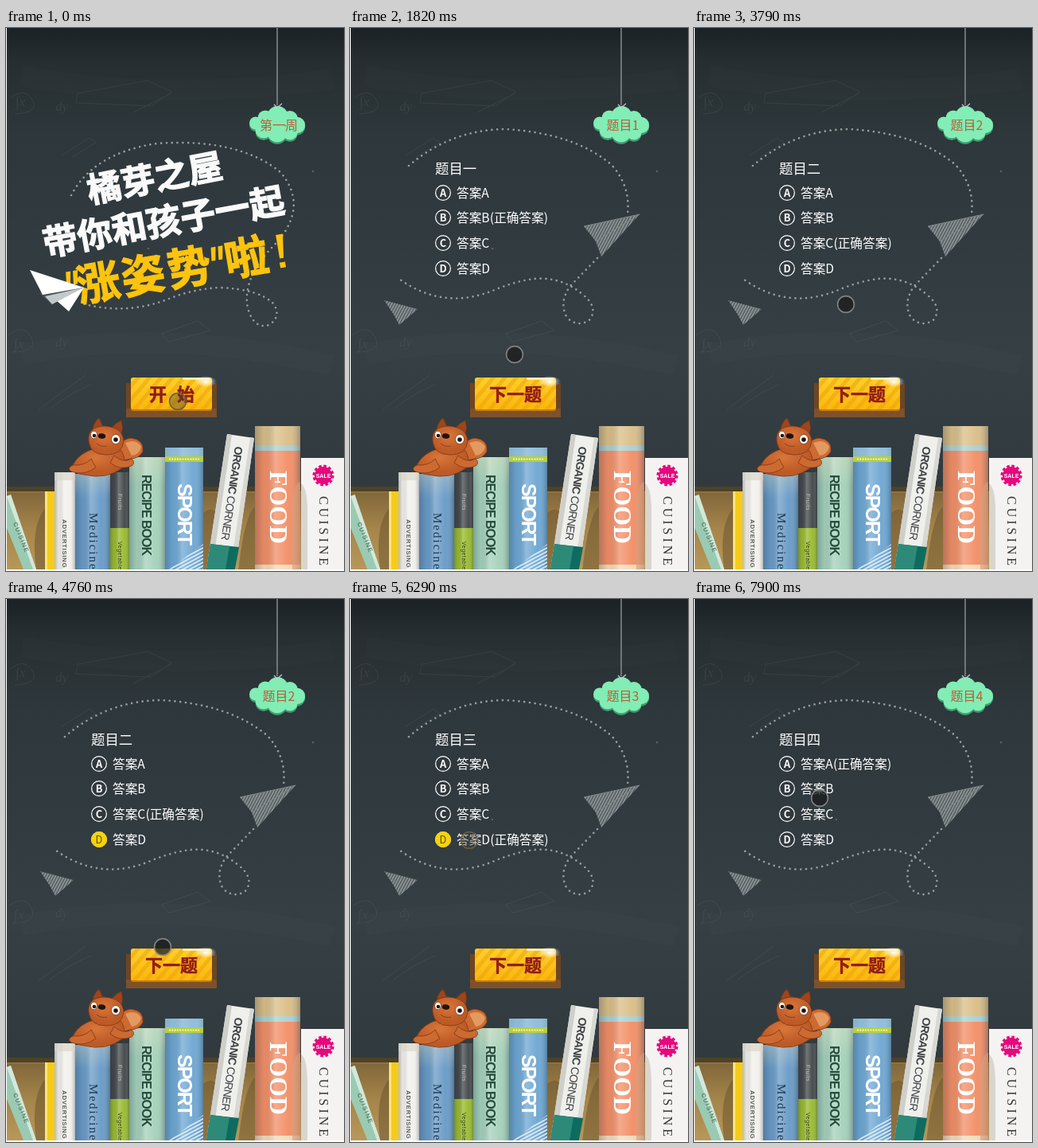
Animation, 425 px wide and 682 px high, one loop 8000 ms. Source, as an HTML page:

```html
<!DOCTYPE html>
<html lang="zh-CN">
<head>
<meta charset="utf-8">
<title>题目</title>
<style>
html, body { margin: 0; width: 100%; height: 100%; overflow: hidden; background: #fff; }
svg { display: block; width: 425px; height: 682px; }
text { font-family: "Noto Sans CJK SC", "Noto Sans CJK", "Noto Sans", sans-serif; }
.sans { font-family: "Liberation Sans", sans-serif; }
.serif { font-family: "Liberation Serif", serif; }
.mid { text-anchor: middle; }
.headline { font-weight: 900; fill: #fafafa; stroke: #fafafa; stroke-width: 1.3; text-anchor: middle; }
.yellow { fill: #fcc30f; stroke: #fcc30f; }
.label { font-weight: 700; font-size: 22px; fill: #921c17; stroke: #921c17; stroke-width: .5; text-anchor: middle; }
.tag { font-size: 16px; fill: #b9623a; text-anchor: middle; }
.dots { fill: none; stroke: #969c9d; stroke-width: 2.7; stroke-linecap: round; stroke-dasharray: 0 6.8; }
.chalk { fill: none; stroke: #c9d3d3; opacity: .08; }
.chalk text { font: italic 17px "Liberation Serif", serif; fill: #c9d3d3; stroke: none; }

.anim { animation: 8s step-end infinite; }
#intro { animation-name: intro; }
#board { animation-name: board; }
#status { animation-name: status; }
#q1 { animation-name: q1; }
#q2 { animation-name: q2; }
#q3 { animation-name: q3; }
#q4 { animation-name: q4; }
#pick1 { animation-name: pick1; }
#pick2 { animation-name: pick2; }
#pick3 { animation-name: pick3; }
#cursor { animation-name: move, press; stroke-width: 1.6; }

@keyframes intro { 0% { opacity: 1 } 14.375%, 100% { opacity: 0 } }
@keyframes board { 0% { opacity: 0 } 14.375%, 100% { opacity: 1 } }
@keyframes status { 0% { opacity: 0 } 14.375% { opacity: 1 } 17.75%, 100% { opacity: 0 } }
@keyframes q1 { 0% { opacity: 0 } 14.375% { opacity: 1 } 43.875%, 100% { opacity: 0 } }
@keyframes q2 { 0% { opacity: 0 } 43.875% { opacity: 1 } 65.875%, 100% { opacity: 0 } }
@keyframes q3 { 0% { opacity: 0 } 65.875% { opacity: 1 } 90.125%, 100% { opacity: 0 } }
@keyframes q4 { 0% { opacity: 0 } 90.125%, 100% { opacity: 1 } }
@keyframes pick1 { 0% { opacity: 0 } 33.25%, 100% { opacity: 1 } }
@keyframes pick2 { 0% { opacity: 0 } 54.125%, 100% { opacity: 1 } }
@keyframes pick3 { 0% { opacity: 0 } 78.625%, 100% { opacity: 1 } }
@keyframes press {
  0%, 42.125%, 52.5%, 63.75%, 75.125%, 87.875% { fill: rgba(70, 66, 52, .38); stroke: rgba(104, 94, 68, .95) }
  19.625%, 47.375%, 57.625%, 68%, 80.875%, 92%, 100% { fill: rgba(26, 28, 30, .75); stroke: #808080 }
}
@keyframes move {
  0% { transform: translate(216px, 469px) }
  19.625% { transform: translate(214px, 455px) }
  21.625% { transform: translate(207px, 410px) }
  23.625% { transform: translate(195px, 350px) }
  25.625% { transform: translate(182px, 295px) }
  27.5% { transform: translate(172px, 262px) }
  29.5% { transform: translate(168px, 250px) }
  31.375% { transform: translate(168px, 242px) }
  36.75% { transform: translate(172px, 264px) }
  38.5% { transform: translate(190px, 350px) }
  40.25% { transform: translate(204px, 440px) }
  42.125% { transform: translate(206px, 460px) }
  47.375% { transform: translate(191px, 347px) }
  49.125% { transform: translate(172px, 315px) }
  50.75% { transform: translate(154px, 300px) }
  52.5% { transform: translate(150px, 298px) }
  57.625% { transform: translate(170px, 360px) }
  59.5% { transform: translate(197px, 437px) }
  61.625% { transform: translate(197px, 454px) }
  68% { transform: translate(195px, 400px) }
  70.25% { transform: translate(186px, 337px) }
  71.75% { transform: translate(170px, 316px) }
  73.375% { transform: translate(152px, 304px) }
  75.125% { transform: translate(150px, 303px) }
  80.875% { transform: translate(168px, 350px) }
  83.25% { transform: translate(200px, 440px) }
  85.5% { transform: translate(215px, 468px) }
  92% { transform: translate(210px, 440px) }
  93.75% { transform: translate(195px, 370px) }
  95.375% { transform: translate(178px, 300px) }
  97.125% { transform: translate(163px, 258px) }
  98.75%, 100% { transform: translate(158px, 250px) }
}
</style>
</head>
<body>
<svg viewBox="0 0 425 682">
  <defs>
    <clipPath id="stage"><path d="M1 0H425V680H1Z"/></clipPath>
    <linearGradient id="slate" x2="0" y2="1">
      <stop offset="0" stop-color="#1b2124"/><stop offset=".06" stop-color="#262e31"/>
      <stop offset=".2" stop-color="#2e373b"/><stop offset=".6" stop-color="#353f44"/>
      <stop offset="1" stop-color="#2e373b"/>
    </linearGradient>
    <linearGradient id="wood" x2="0" y2="1">
      <stop offset="0" stop-color="#7b6238"/><stop offset=".5" stop-color="#a5854a"/>
      <stop offset="1" stop-color="#b9985a"/>
    </linearGradient>
    <linearGradient id="round">
      <stop offset="0" stop-color="#203040" stop-opacity=".28"/><stop offset=".2" stop-color="#203040" stop-opacity=".05"/>
      <stop offset=".45" stop-color="#fff" stop-opacity=".26"/><stop offset=".75" stop-color="#fff" stop-opacity=".04"/>
      <stop offset="1" stop-color="#203040" stop-opacity=".32"/>
    </linearGradient>
    <linearGradient id="warm" x2="0" y2="1">
      <stop offset="0" stop-color="#efe6c4" stop-opacity=".3"/><stop offset=".25" stop-color="#efe6c4" stop-opacity="0"/>
    </linearGradient>
    <linearGradient id="gold" x2="0" y2="1">
      <stop offset="0" stop-color="#ffd02a"/><stop offset="1" stop-color="#fbb70c"/>
    </linearGradient>
    <radialGradient id="glow"><stop offset="0" stop-color="#fff"/><stop offset="1" stop-color="#fff" stop-opacity="0"/></radialGradient>
    <radialGradient id="fur" cx=".45" cy=".35"><stop offset="0" stop-color="#d9763b"/><stop offset="1" stop-color="#bd5a26"/></radialGradient>
    <pattern id="stripes" width="11" height="11" patternUnits="userSpaceOnUse" patternTransform="rotate(40)">
      <path d="M0 0H5V11H0Z" fill="#e9a00c" opacity=".5"/>
    </pattern>
    <pattern id="hatch" width="3.2" height="30" patternUnits="userSpaceOnUse" patternTransform="rotate(28)">
      <path d="M0 0H3.2V30H0Z" fill="#8d9495" opacity=".3"/><path d="M0 0H1.9V30H0Z" fill="#8d9495"/>
    </pattern>
    <pattern id="diag" width="4" height="4" patternUnits="userSpaceOnUse" patternTransform="rotate(62)">
      <path d="M0 0H1.6V4H0Z" fill="#e8f4fb"/>
    </pattern>
    <g id="cloud">
      <circle cx="314" cy="119.5" r="8"/><circle cx="326" cy="113" r="9.5"/><circle cx="341.5" cy="111" r="13"/>
      <circle cx="357" cy="114" r="10"/><circle cx="366" cy="122" r="10.2"/><circle cx="357" cy="131" r="9.5"/>
      <circle cx="341" cy="131" r="12.5"/><circle cx="324" cy="128" r="10.5"/>
    </g>
  </defs>

  <g clip-path="url(#stage)">
    <path d="M0 0H425V682H0Z" fill="url(#slate)"/>
    <g class="chalk">
      <path d="M90 82l88-16 30 14-25 18-95-4zM5 88q18-14 28 2t-22 18M70 160l35-22 8 6-30 18M160 106l48-24M4 385q20-14 28 4t-24 18M40 480l60-44M55 478q30-22 52-30M195 384l46-16 16 12-52 14z"/>
      <path d="M20 60q180 34 390 4M20 410q180-36 390 14" stroke-width="26" opacity=".18"/>
      <text x="62" y="104">dy</text><text x="62" y="400">dy</text>
      <text x="12" y="98">∫x</text><text x="10" y="402">∫x</text>
    </g>
    <circle cx="386" cy="180" r="1.3" fill="#59635f"/><circle cx="179" cy="277" r="1.3" fill="#59635f"/>

    <path d="M341 0V97" stroke="#969d9e" stroke-width="1.3"/>
    <use href="#cloud" y="2.5" fill="#3f9a70"/>
    <use href="#cloud" fill="#82edb4"/>
    <path d="M341 100l-4-4m4 4l6-5" stroke="#c5cccb" stroke-width="1.2"/>

    <g id="shelf">
      <path d="M0 576H425V682H0Z" fill="url(#wood)"/>
      <path d="M0 576H425V582H0Z" fill="#4e4126"/><path d="M0 582H425V584H0Z" fill="#8d7342"/>
      <path d="M38 682Q30 622 52 600V682ZM247 682V610Q262 596 270 620V682ZM292 682Q300 610 314 600V682Z" fill="#6d562f" opacity=".55"/>

      <path d="M1 588L6 586L38 680H22L1 628Z" fill="#9bcab2"/>
      <path d="M1 588L6 586L38 680H34Z" fill="#d2e8db"/>
      <text class="sans" font-size="7.5" letter-spacing="1.5" fill="#2f5c49" transform="translate(9 622) rotate(68)">CUISINE</text>

      <path d="M49 582H61V680H49Z" fill="#f5cb1b"/><path d="M49 582H52V680H49Z" fill="#fbe377"/>
      <path d="M61 558H87V680H61Z" fill="#f2f0eb"/><path d="M61 558H87V680H61Z" fill="url(#round)"/>
      <path d="M61 558H87V568H61Z" fill="#d9d4c5" opacity=".6"/>
      <text class="sans" font-size="8" font-weight="700" letter-spacing=".6" fill="#5a5a5a" transform="translate(70.5 617) rotate(90)">ADVERTISING</text>

      <path d="M87 560H131V680H87Z" fill="#6799c6"/>
      <path d="M87 560H131V680H87Z" fill="url(#round)"/><path d="M87 560H131V680H87Z" fill="url(#warm)"/>
      <text class="serif" font-size="15" letter-spacing="2" fill="#183851" transform="translate(105 609) rotate(90)">Medicine</text>

      <path d="M131 558H155V628H131Z" fill="#414648"/><path d="M131 628H155V680H131Z" fill="#98b92b"/>
      <path d="M131 558H155V680H131Z" fill="url(#round)"/>
      <text class="sans" font-size="7" letter-spacing=".6" fill="#c3c7c5" transform="translate(140.5 585) rotate(90)">Fruits</text>
      <text class="sans" font-size="7" letter-spacing=".5" fill="#2f3d0d" transform="translate(140.5 645) rotate(90)">Vegetable</text>

      <path d="M155 539H200V680H155Z" fill="#a3d0b9"/>
      <path d="M155 539H200V680H155Z" fill="url(#round)"/><path d="M155 539H200V680H155Z" fill="url(#warm)"/>
      <text class="sans" font-size="16" letter-spacing="-1" font-weight="700" fill="#254c3b" transform="translate(171 561) rotate(90)">RECIPE BOOK</text>

      <path d="M200 527H248V680H200Z" fill="#6ca6d2"/><path d="M200 527H248V680H200Z" fill="url(#round)"/>
      <path d="M200 527H248V539H200Z" fill="#a7cbe0" opacity=".6"/>
      <path d="M200 538H248V545H200Z" fill="#b9cf3a"/>
      <path d="M205 541.5H243" stroke="#f0f5c8" stroke-width="2" stroke-dasharray="2 1.3"/>
      <path d="M205 680L248 648V680Z" fill="url(#diag)"/>
      <text class="sans" font-size="25" letter-spacing="-2" font-weight="700" fill="#fff" transform="translate(215.5 572) rotate(90)">SPORT</text>

      <path d="M278 510L312 515L288 680H252Z" fill="#efefec"/>
      <path d="M278 510L284 511L259 680H252Z" fill="#cfcfca"/>
      <path d="M307 514L312 515L288 680H282Z" fill="#d8d8d3"/>
      <path d="M257 648L293 652L288 680H252Z" fill="#0d6c5f"/><path d="M257 648L281 651L276 680H252Z" fill="#2d8a78"/>
      <text class="sans" font-size="14" letter-spacing="-.9" fill="#3c4143" transform="translate(288 525) rotate(98.5)"><tspan font-weight="700">ORGANIC</tspan> CORNER</text>

      <path d="M313 500H370V680H313Z" fill="#f28d64"/><path d="M313 500H370V524H313Z" fill="#d9bd86"/>
      <path d="M313 524H370V531H313Z" fill="#a9cfd0"/><path d="M313 674H370V680H313Z" fill="#f5d9b8"/>
      <path d="M313 500H370V680H313Z" fill="url(#round)"/>
      <text class="serif" font-size="31.8" font-weight="700" fill="#fff" transform="translate(331.5 556) rotate(90)">FOOD</text>

      <path d="M371 540H425V680H371Z" fill="#f4f3f1"/>
      <path d="M371 572Q379 578 379 606V680H371Z" fill="#d9d5cd"/>
      <path d="M360 680V590Q364 570 370 570V680Z" fill="#d9a07c" opacity=".6"/>
      <circle cx="399" cy="562" r="11" fill="#e5087e" stroke="#e5087e" stroke-width="5" stroke-dasharray="3.3 2.46"/>
      <text class="sans mid" x="399" y="564.5" font-size="7" font-weight="700" fill="#fff">SALE</text>
      <text class="serif" font-size="16" letter-spacing="4" fill="#333" transform="translate(394 588) rotate(90)">CUISINE</text>
    </g>

    <g id="squirrel" stroke="#7d3814" stroke-width=".8">
      <path d="M138 546Q138 517 157 515Q174 517 172 532Q167 541 156 541Z" fill="#cd6a32"/>
      <path d="M150 521Q164 515 170 526Q168 536 158 537Z" fill="#e39a60" stroke="none"/>
      <path d="M84 549Q92 533 113 528L142 527Q153 540 147 552Q126 568 98 561Q84 560 84 549Z" fill="url(#fur)"/>
      <path d="M109 504Q111 494 117 490L123 503ZM133 502Q139 495 145 493Q148 502 145 510Z" fill="#9d451c"/>
      <path d="M104 519Q102 501 123 500Q147 501 148 519Q146 536 126 536Q106 536 104 519Z" fill="url(#fur)"/>
      <path d="M136 537Q147 547 158 541Q163 546 158 550Q143 556 131 546Z" fill="#cd6a32"/>
      <path d="M107 541Q99 550 84 549Q76 553 82 557Q98 563 113 552Z" fill="#cd6a32"/>
      <ellipse cx="110.5" cy="511" rx="4" ry="4.8" fill="#fff"/><ellipse cx="138" cy="516.5" rx="5.5" ry="6" fill="#fff"/>
      <g fill="#22130c" stroke="none">
        <circle cx="111" cy="512" r="2.3"/><circle cx="138" cy="517" r="2.8"/>
        <ellipse cx="120.5" cy="512.5" rx="4.8" ry="3.2" transform="rotate(10 120.5 512.5)"/>
      </g>
      <path d="M114 522Q120 527 127 525" fill="none"/>
    </g>

    <path d="M151 446H265V489H151Z" fill="#6f4523"/><path d="M151 478H265V489H151Z" fill="#7f5129"/>
    <rect x="157" y="440" width="102" height="41" rx="3" fill="#c77f0b"/>
    <rect x="157" y="439" width="102" height="40" rx="3" fill="url(#gold)"/>
    <rect x="157" y="439" width="102" height="40" rx="3" fill="url(#stripes)"/>
    <path d="M222 440.5H256" stroke="#fff4c4" stroke-width="2.5"/>
    <ellipse cx="251" cy="444" rx="14" ry="7" fill="url(#glow)"/>

    <g id="intro" class="anim">
      <path class="dots" d="M82 210Q110 157 190 145Q292 138 345 181Q380 222 342 268Q296 312 304 352Q312 379 331 373Q347 362 336 346Q318 328 268 326Q235 328 205 340Q150 362 92 345"/>
      <text class="headline" font-size="43" transform="translate(187 188) rotate(-11)" dy=".37em">橘芽之屋</text>
      <text class="headline" font-size="44" transform="translate(198 243) rotate(-10.4)" dy=".37em">带你和孩子一起</text>
      <g class="yellow" transform="translate(116 320) rotate(-9.6)">
        <text class="headline yellow" font-size="55" y="20"><tspan x="0">涨</tspan><tspan x="57">姿</tspan><tspan x="116">势</tspan><tspan x="189">啦</tspan></text>
        <path stroke="none" d="M-38-20h6l-3 17h-5zM-29-20h6l-3 17h-5zM147-20h6l-3 17h-5zM156-20h6l-3 17h-5zM230-22h9l-4 30h-5zM229 13h7v7h-7z"/>
      </g>
      <path d="M42 333L98 326L57 347Z" fill="#4a5357"/>
      <path d="M30 304L98 326L46 335ZM98 326L79 356L62 341Z" fill="#fff"/>
      <path d="M49 337L98 326L58 347Z" fill="#c3c9cb"/>
      <text class="tag" x="343" y="128">第一周</text>
      <text class="label" y="468"><tspan x="191">开</tspan><tspan x="226">始</tspan></text>
    </g>

    <g id="board" class="anim">
      <path class="dots" d="M74 173Q126 128 195 127Q282 132 329 172Q353 199 349 233M311 289L277 324Q262 345 273 364Q287 377 302 366Q312 350 293 335Q266 312 232 315Q212 317 184 328Q120 356 63 316"/>
      <path d="M294 249L364 234L316 287L309 268Z" fill="url(#hatch)"/>
      <path d="M309 268L364 234M294 249L364 234" stroke="#7f8788"/>
      <path d="M43 342L85 353L62 373L55 360Z" fill="url(#hatch)"/>
      <text class="label" x="208" y="468">下一题</text>
    </g>

    <g id="quiz"></g>

    <g id="status" class="anim">
      <path d="M1 659.5H138Q141.5 659.5 141.5 663V680H1Z" fill="#f4f4f4" stroke="#b7b7b7"/>
      <text x="4" y="674" font-size="12" fill="#555">正在等待扩展程序<tspan font-family="Noto Sans, sans-serif">“ZeVo...</tspan></text>
    </g>
    <circle id="cursor" class="anim" r="10.4"/>
  </g>
</svg>
<script>
const rows = [207, 238, 270, 302];
const quizzes = [
  { name: "一", right: "B", pick: "B" },
  { name: "二", right: "C", pick: "D" },
  { name: "三", right: "D", pick: "D" },
  { name: "四", right: "A" }
];

const badge = (letter, y, ring, ink, weight) =>
  `<circle cx="117" cy="${y}" r="9.4" ${ring}/>
   <text class="mid" x="117" y="${y + 4.6}" font-size="12.8" font-weight="${weight}" fill="${ink}">${letter}</text>`;

function option(letter, i, quiz, n) {
  const y = rows[i];
  const note = letter === quiz.right ? "(正确答案)" : "";
  const picked = letter === quiz.pick
    ? `<g id="pick${n}" class="anim">${badge(letter, y, 'fill="#fdd106" stroke="#fdd106"', "#57521f", 400)}</g>` : "";
  return badge(letter, y, 'fill="#30393d" stroke="#fff" stroke-width="1.2"', "#fff", 700) + picked +
    `<text x="134" y="${y + 6}" font-size="15.7" fill="#fff">答案${letter}${note}</text>`;
}

document.getElementById("quiz").innerHTML = quizzes.map((quiz, i) => `
  <g id="q${i + 1}" class="anim">
    <text class="tag" x="343" y="128" font-weight="500">题目${i + 1}</text>
    <text x="107" y="183" font-size="17.4" fill="#fff">题目${quiz.name}</text>
    ${[..."ABCD"].map((letter, k) => option(letter, k, quiz, i + 1)).join("")}
  </g>`).join("");
</script>
</body>
</html>
```
